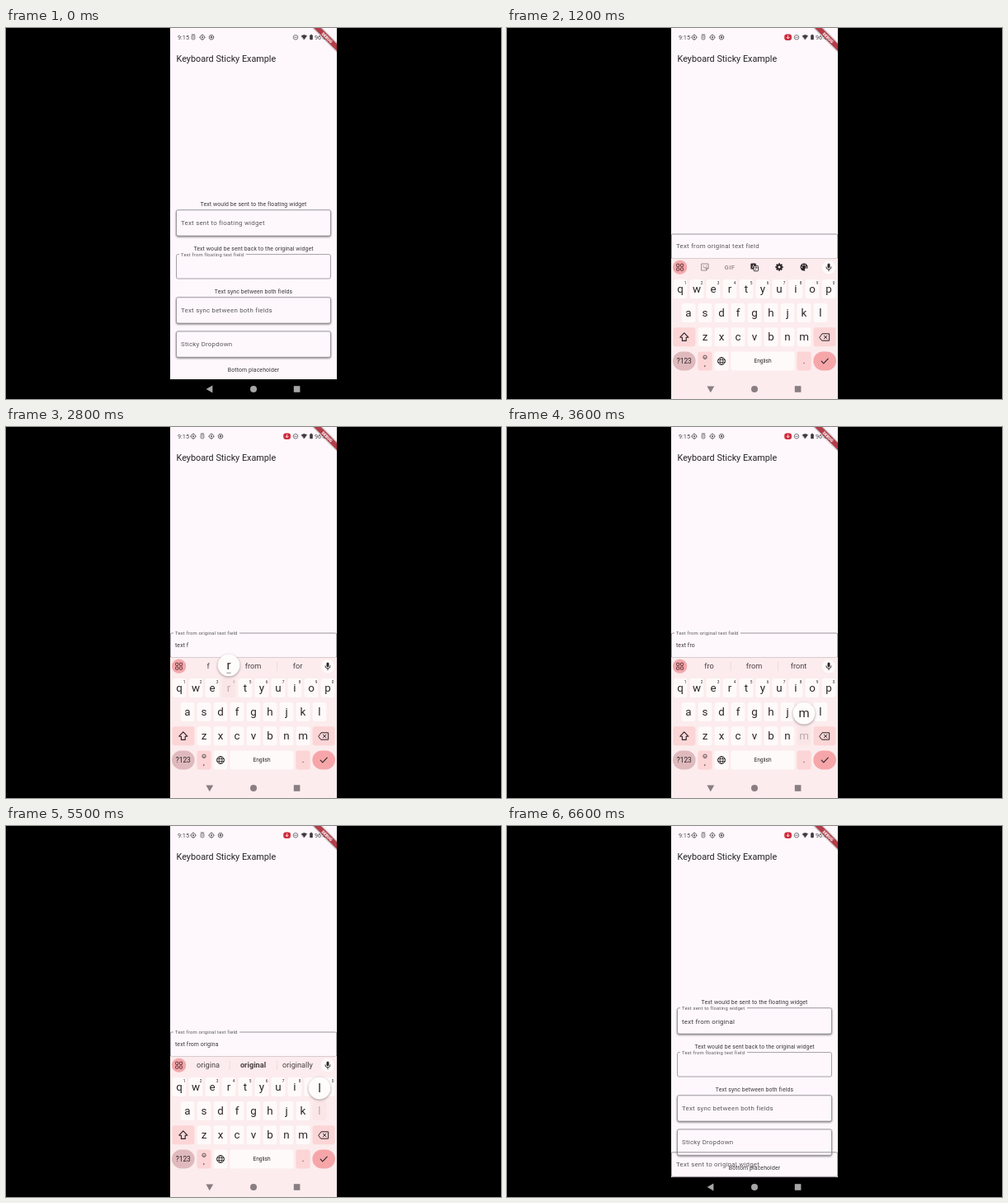
An HTML page that plays this animation: 600x450 px, repeating every 8 s.

```html
<!DOCTYPE html>
<html lang="en">
<head>
<meta charset="utf-8">
<title>Keyboard Sticky Example</title>
<style>
  html, body { margin: 0; width: 100%; height: 100%; overflow: hidden; background: #000; }
  svg { display: block; width: 600px; height: 450px; font-family: Roboto, "Noto Sans", sans-serif; }
  text { white-space: pre; }
  .raised { filter: drop-shadow(0 1px .9px rgba(0, 0, 0, .5)); }
  .popup { filter: drop-shadow(0 1px 1.6px rgba(60, 30, 35, .45)); }
  .ribbon { filter: drop-shadow(0 .6px 1px rgba(0, 0, 0, .7)); }
</style>
</head>
<body>
<svg id="stage" viewBox="0 0 600 450"></svg>
<script>
const LOOP = 8000, STEP = 100;
const DP = 0.492;
const BG = '#fef8fc', INK = '#39363a', SOFT = '#5b575c', LINE = '#8f8a90';
const KB_BG = '#fceced', KEY = '#fffafa', ALT = '#fcd5d7', KB_INK = '#2c2527';
const KB_TRAVEL = 171, SCROLL = 42;

// [time, value] tables, linear between entries
const KEYBOARD = [[700, 0], [800, .2], [900, .7515], [1000, .95], [1100, 1], [5900, 1],
  [6000, .9], [6100, .5], [6200, .12], [6300, 0]];
const FIELD_LABEL = [[700, 0], [800, .5], [900, 1]];
const FLOAT_SHOW = [[1000, 0], [1200, 1]];
const FLOAT_LABEL = [[1300, 0], [1600, 1], [6000, 1], [6200, 0]];
const FLOAT_FILL = [[6200, 1], [6500, 0]];
const CAST = [[0, 0], [400, 1]];

// [time, typed text, pressed key, suggestions]
const TYPING = [
  [0, '', '', ''],
  [1700, '', 't', ''],
  [1800, 't', 'e', 't,the,to'],
  [2000, 'te', 'x', 'te,TE,text'],
  [2200, 'tex', 't', 'tex,text,texts'],
  [2300, 'text', '', 'text,texts,texting'],
  [2400, 'text', ' ', 'text,texts,texting'],
  [2500, 'text ', '', 'me,you,the'],
  [2600, 'text ', 'f', 'me,you,the'],
  [2700, 'text f', '', 'f,from,for'],
  [2800, 'text f', 'r', 'f,from,for'],
  [2900, 'text fr', 'o', 'fr,from,free'],
  [3000, 'text fro', '', 'fro,from,front'],
  [3600, 'text fro', 'm', 'fro,from,front'],
  [3700, 'text from', ' ', 'from,from the,form'],
  [3900, 'text from ', '', 'my,the,you'],
  [4300, 'text from ', 'o', 'my,the,you'],
  [4400, 'text from o', '', 'o,of,our'],
  [4600, 'text from o', 'r', 'o,of,our'],
  [4700, 'text from or', '', 'or,order,original'],
  [4800, 'text from or', 'i', 'or,order,original'],
  [4900, 'text from ori', '', 'ori,original,origin'],
  [5000, 'text from ori', 'g', 'ori,original,origin'],
  [5100, 'text from orig', 'i', 'orig,original,origin'],
  [5200, 'text from origi', 'n', 'origi,original,origin'],
  [5300, 'text from origin', '', 'origin,original,origins'],
  [5400, 'text from origin', 'a', 'origin,original,origins'],
  [5500, 'text from origina', 'l', 'origina,*original,originally'],
  [5800, 'text from original', '', 'original,originals,originally'],
  [5900, 'text from original', 'enter', 'original,originals,originally'],
];

const lerp = (a, b, p) => a + (b - a) * p;

function at(table, t) {
  if (t <= table[0][0]) return table[0][1];
  for (let i = 1; i < table.length; i++) {
    const [t0, a] = table[i - 1], [t1, b] = table[i];
    if (t <= t1) return lerp(a, b, (t - t0) / (t1 - t0));
  }
  return table[table.length - 1][1];
}

const text = (x, y, size, s, fill = INK, extra = '') =>
  `<text x="${x}" y="${y}" font-size="${size}" fill="${fill}" ${extra}>${s}</text>`;
const mid = (x, y, size, s, fill, extra = '') =>
  text(x, y, size, s, fill, `text-anchor="middle" ${extra}`);
const rect = (x, y, w, h, fill, r = 0, extra = '') =>
  `<rect x="${x}" y="${y}" width="${w}" height="${h}" rx="${r}" fill="${fill}" ${extra}/>`;
const dot = (x, y, r, fill, extra = '') => `<circle cx="${x}" cy="${y}" r="${r}" fill="${fill}" ${extra}/>`;
const path = (d, stroke, w = 1, fill = 'none') =>
  `<path d="${d}" fill="${fill}" stroke="${stroke}" stroke-width="${w}" stroke-linejoin="round" stroke-linecap="round"/>`;
const group = (x, y, body, extra = '') => `<g transform="translate(${x} ${y})" ${extra}>${body}</g>`;
const spacing = dp => `letter-spacing="${dp * DP}"`;

// Input label moving between resting (p = 0) and floated (p = 1)
function label(x, rest, top, s, p, color = SOFT) {
  const k = lerp(1, .75, p);
  return text(x, lerp(rest, top, p), 16 * DP * k, s, color, spacing(.5 * k));
}

function field(y, h, name, { lift = 0, raised = true, focus = false, value = '', gap = 81 } = {}) {
  const stroke = focus ? '#5a565b' : LINE;
  let out = rect(206.5, y, 187, h, BG, 2,
    `stroke="${stroke}" stroke-width="${focus ? 1.3 : .8}" ${raised ? 'class="raised"' : ''}`);
  if (lift > 0) out += rect(210, y - 1.5, gap * lift, 3, BG);
  out += label(212, y + h / 2 + 2.8, y + 2, name, lift);
  if (value) out += text(212, y + 18.8, 16 * DP, value, INK, spacing(.5));
  if (focus) out += rect(212.6, y + 10, .9, 12, '#4a464b');
  return out;
}

const caption = (y, s) => mid(300, y, 14 * DP, s, INK, spacing(.25));

function content(t) {
  return caption(215.8, 'Text would be sent to the floating widget') +
    field(220.8, 31.3, 'Text sent to floating widget', {
      lift: at(FIELD_LABEL, t),
      focus: t >= 800 && t < 1300,
      value: t >= 5800 ? 'text from original' : '',
    }) +
    caption(269.5, 'Text would be sent back to the original widget') +
    field(274.6, 29.4, 'Text from floating text field', { lift: 1, raised: false }) +
    caption(321.6, 'Text sync between both fields') +
    field(326.8, 31.3, 'Text sync between both fields') +
    field(368, 31.3, 'Sticky Dropdown') +
    caption(416.7, 'Bottom placeholder');
}

function floating(t, typed, drop) {
  const p = at(FLOAT_LABEL, t), done = t >= 6100;
  const name = done ? 'Text sent to original widget' : 'Text from original text field';
  let out = rect(199, 246, 202, 34, BG, 0, `opacity="${at(FLOAT_FILL, t)}"`) +
    rect(199.2, 250, 201.6, 29.6, 'none', 2, `stroke="${LINE}" stroke-width=".9"`);
  if (p > 0) out += rect(203, 248.5, 80 * p, 3, BG);
  out += label(205, 267.3, 252, name, p);
  if (!done) out += text(205, 267, 14 * DP, typed, INK, spacing(.25));
  return group(0, Math.min(drop, 145.8), out, `opacity="${at(FLOAT_SHOW, t)}"`);
}

const C = '#5d585d';
const target = x => dot(x, 11.3, 2.7, 'none', `stroke="${C}" stroke-width=".8"`) + dot(x, 11.3, 1.1, C) +
  path(`M${x - 3.4} 11.3h.8M${x + 2.6} 11.3h.8M${x} 7.9v.8M${x} 13.9v.8`, C, .8);
const doc = x => rect(x - 1.9, 8.9, 3.8, 5, 'none', 1, `stroke="${C}" stroke-width=".8"`) +
  path(`M${x - 1.8} 8h3.6M${x} 10.6v1.6`, C, .8);
const gear = x => dot(x, 11.3, 2.7, 'none', `stroke="${C}" stroke-width="1.1" stroke-dasharray="1.6 .5"`) +
  dot(x, 11.3, 1.2, C);

function statusBar(t) {
  const icons = t < 200 ? [doc, target, gear] : [target, doc, target, gear];
  const cast = rect(336.2, 7.6, 8.8, 7.4, '#cf2b3d', 3) +
    path('M340.6 9.4v3.4M339 11.3l1.6 1.6 1.6-1.6', '#fff', .8);
  return text(208, 13.9, 7.3, '9:15', '#4d484d') +
    icons.map((icon, i) => icon(227 + 11 * i)).join('') +
    `<g opacity="${at(CAST, t)}">${cast}</g>` +
    dot(351, 11.3, 2.8, 'none', `stroke="${C}" stroke-width=".8"`) + path('M349.7 11.3h2.6', C, .8) +
    path('M358.2 9.6Q361.4 7.2 364.6 9.6L361.4 13.8Z', '#3d393d', .6, '#3d393d') +
    rect(368.2, 8.5, 3.6, 5.8, '#3d393d', .7) + rect(369.2, 7.8, 1.6, 1, '#3d393d') +
    text(374, 13.9, 7.3, '96%', '#4d484d');
}

const ribbon = () => `<g transform="translate(389.2 11.8) rotate(45)">` +
  rect(-22, -3, 44, 6, '#b23d48', 0, 'class="ribbon"') +
  mid(0, 1.8, 5, 'DEBUG', '#fff', 'font-weight="900"') + '</g>';

const ROWS = [['qwertyuiop', 210, 316.3], ['asdfghjkl', 220, 345.4], ['zxcvbnm', 240, 374.6]];
const KEYS = ROWS.flatMap(([chars, x, y], row) =>
  [...chars].map((c, i) => ({ c, x: x + 20 * i, y, hint: row ? '' : (i + 1) % 10 })));

function key({ c, x, y, hint }, held) {
  const down = c === held;
  return rect(x - 8.4, y - 11.4, 16.8, 23, down ? '#fbe6e7' : KEY, 3) +
    mid(x, y + 4.2, 13.4, c, down ? '#b9a9ab' : KB_INK) +
    (hint === '' ? '' : mid(x + 6.2, y - 5, 4.8, hint, down ? '#b9a9ab' : KB_INK));
}

function popup(held) {
  const k = KEYS.find(k => k.c === held);
  if (!k) return '';
  return group(k.x, k.y - 27.4, dot(0, 0, 13.4, '#fffcfc', 'class="popup"') +
    mid(0, 4.6, 15, k.c, KB_INK) + (k.hint === '' ? '' : path('M-2.2 9.4h4.4', '#6b6062', .7)));
}

function tools() {
  const teeth = [...Array(8)].map((_, i) =>
    `<rect x="-1" y="-4.6" width="2" height="2.4" transform="rotate(${45 * i})" fill="${KB_INK}"/>`).join('');
  return group(240, 290, path('M-4-4H4V1.5L1.5 4H-4ZM4 1.5H1.5V4M-2 .3Q0 2.3 2 .3', '#8f8385', .9) +
      dot(-1.6, -1.5, .6, '#8f8385') + dot(1.6, -1.5, .6, '#8f8385')) +
    mid(270, 292.8, 7.6, 'GIF', '#a09496', 'font-weight="700" letter-spacing=".4"') +
    group(300, 290, rect(-4.6, -4.6, 6.4, 7, KB_INK, 1) + mid(-1.4, .8, 5, 'A', KB_BG, 'font-weight="700"') +
      rect(-1, -1.6, 5.6, 6.4, KB_BG, 1, `stroke="${KB_INK}" stroke-width=".9"`) +
      path('M.3 .4h3M1.8 -.4v.8M.6 3.2Q2.6 2.4 2.8 .4', KB_INK, .6)) +
    group(330, 290, teeth + dot(0, 0, 3.5, KB_INK) + dot(0, 0, 1.4, KB_BG)) +
    group(360, 290, dot(0, 0, 4.5, KB_INK) + dot(2.6, 3, 1.7, KB_BG) +
      [[-2.6, .2], [-1.3, -2.3], [1.3, -2.3], [2.6, 0]].map(([x, y]) => dot(x, y, .8, KB_BG)).join(''));
}

function suggestions(words) {
  return words.split(',').map((w, i) => {
    const bold = w[0] === '*';
    return mid([245, 299.5, 353.5][i], 293.3, 9.2, w.replace('*', ''), '#4a4143', bold ? 'font-weight="700"' : '');
  }).join('') + rect(270.8, 285, .6, 11, '#e3cfd1') + rect(328.2, 285, .6, 11, '#e3cfd1');
}

function bottomRow(held) {
  const y = 392.4, h = 23;
  return rect(201, y, 27.6, h, '#dfb9bc', 11.5) + mid(214.8, 407, 8.4, '?123', KB_INK) +
    rect(231.4, y, 17.2, h, ALT, 3) + mid(240, 409.6, 9, ',', KB_INK) +
    dot(240, 399.3, 2.2, 'none', `stroke="${KB_INK}" stroke-width=".7"`) + path('M239 399.9q1 .9 2 0', KB_INK, .6) +
    rect(251.4, y, 17.2, h, KEY, 3) +
    group(260, 404, dot(0, 0, 4.4, 'none', `stroke="${KB_INK}" stroke-width="1"`) +
      `<ellipse rx="1.9" ry="4.4" fill="none" stroke="${KB_INK}" stroke-width=".8"/>` +
      path('M-4-1.5H4M-4 1.5H4', KB_INK, .8)) +
    rect(271.3, y, 77.4, h, held === ' ' ? '#f7dcde' : KEY, 3) + mid(310, 406.2, 6.5, 'English', KB_INK) +
    rect(351.4, y, 17.2, h, ALT, 3) + mid(360, 407.2, 10, '.', KB_INK) +
    rect(371.4, y, 27.6, h, held === 'enter' ? '#e58f93' : '#f6a6a9', 11.5) +
    path('M381.2 404.2l2.6 2.6 5.4-5.6', KB_INK, 1.1);
}

function keyboard(held, words) {
  const grid = [-2.4, 2.4].flatMap(x => [-2.4, 2.4].map(y =>
    rect(x - 1.6, y - 1.6, 3.2, 3.2, 'none', .6, 'stroke="#5a2f33" stroke-width=".9"'))).join('');
  return rect(199, 279.4, 202, 200, KB_BG) +
    dot(209.6, 290.2, 8.6, '#f4a8ac') + group(209.6, 290.2, grid) +
    (words ? suggestions(words) : tools()) +
    dot(390, 290.2, 8.2, '#fffafa') + rect(388.5, 285.4, 3, 5.8, KB_INK, 1.5) +
    path('M386.9 289.8a3.1 3.1 0 0 0 6.2 0M390 293v1.8', KB_INK, .9) +
    KEYS.map(k => key(k, held)).join('') +
    rect(201.4, 363.2, 27, 23, ALT, 3) +
    path('M214.8 369.8l-5 5.4h2.6v4.2h4.8v-4.2h2.6Z', KB_INK, 1.1) +
    rect(371.6, 363.2, 27, 23, ALT, 3) +
    path('M379 375l3-4.2h8.6v8.4H382ZM384.4 373.2l3.6 3.6M388 373.2l-3.6 3.6', KB_INK, 1) +
    bottomRow(held) + popup(held);
}

function navBar(k) {
  const c = k > .5 ? '#897e81' : '#a6a6a6';
  return `<g transform="translate(246.8 438) rotate(${-90 * k})">` +
    `<path d="M-4.2 0L3.6 -4.4V4.4Z" fill="${c}"/></g>` +
    dot(300, 438, 4, c) + rect(348.8, 434.2, 7.6, 7.6, c);
}

function draw(t) {
  const k = at(KEYBOARD, t);
  const drop = KB_TRAVEL * (1 - k);
  const [, typed, held, words] = TYPING.filter(row => row[0] <= t).pop();
  return '<clipPath id="app"><rect x="199" width="202" height="426.3"/></clipPath>' +
    '<clipPath id="screen"><rect x="199" width="202" height="450"/></clipPath>' +
    `<g clip-path="url(#app)">${rect(199, 0, 202, 426.3, BG)}` +
    group(0, SCROLL * k, content(t)) +
    statusBar(t) + text(206.5, 40.7, 22 * DP, 'Keyboard Sticky Example', '#262328') +
    floating(t, typed, drop) + ribbon() + '</g>' +
    `<g clip-path="url(#screen)">${k > 0 ? group(0, drop, keyboard(held, words)) : ''}${navBar(k)}</g>`;
}

const stage = document.getElementById('stage');
const start = performance.now();
let shown = -1;

function tick() {
  const t = Math.floor(((performance.now() - start) % LOOP) / STEP) * STEP;
  if (t !== shown) {
    shown = t;
    stage.innerHTML = draw(t);
  }
  requestAnimationFrame(tick);
}
tick();
</script>
</body>
</html>
```
